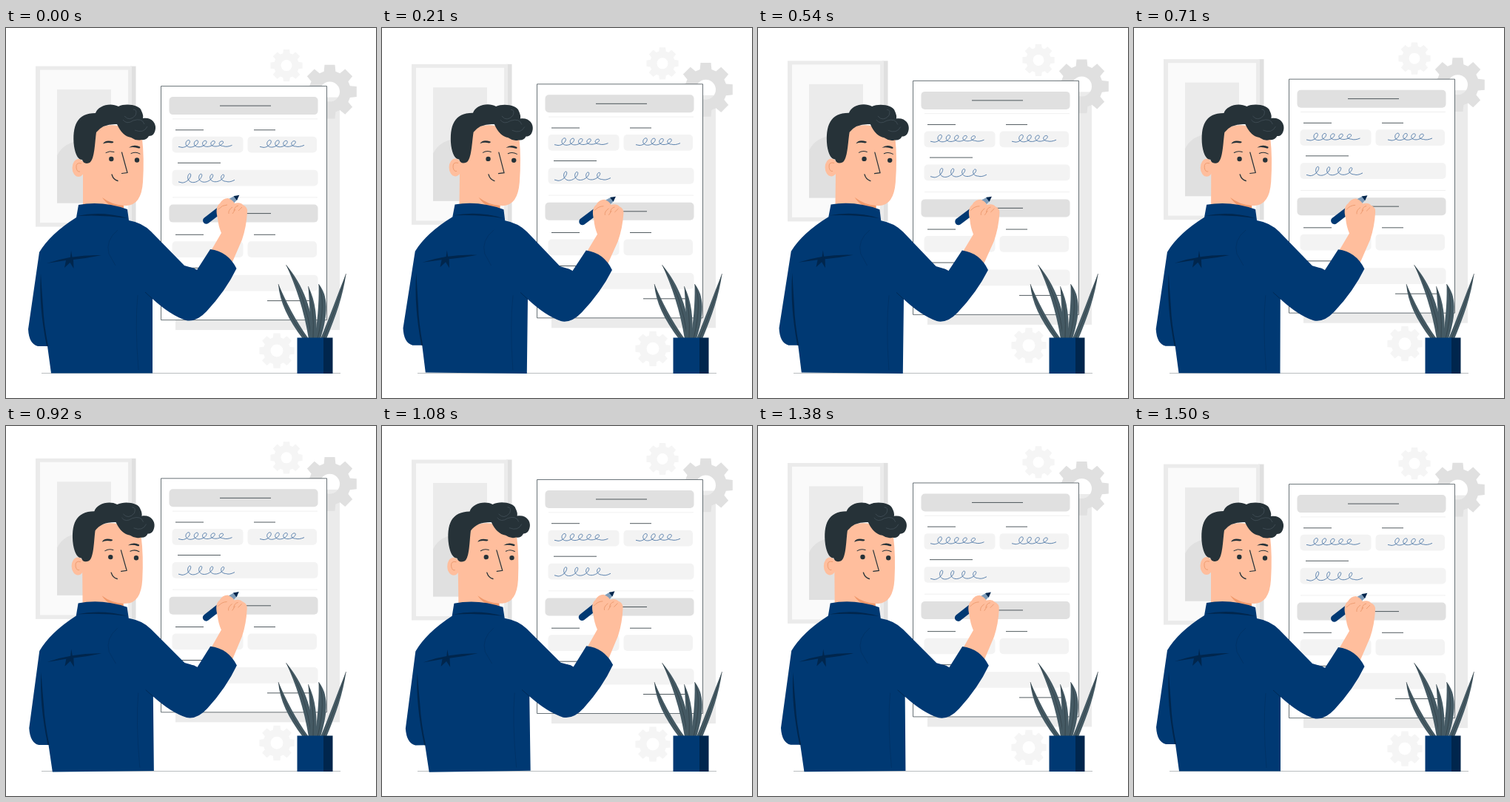
These frames come from a looping animation (500 px wide and 500 px high, 1.54 s). An HTML page with a canvas:

```html
<!DOCTYPE html>
<html lang="en">
<head>
<meta charset="utf-8">
<title>Filling in a form</title>
<style>
html, body { margin: 0; width: 100%; height: 100%; overflow: hidden; background: #fff; }
canvas { display: block; width: 100vmin; height: 100vmin; }
</style>
</head>
<body>
<canvas id="stage" width="500" height="500"></canvas>
<script>
const ctx = document.getElementById('stage').getContext('2d');
const LOOP = 1540, STEPS = 37;
const NAVY = '#003973', DEEP = '#00264d', SKIN = '#ffbe9d', HAIR = '#263238', LEAF = '#455a64';

function fill(path, color) {
  ctx.fillStyle = color;
  ctx.fill(new Path2D(path));
}

function stroke(path, color, width = 1) {
  ctx.strokeStyle = color;
  ctx.lineWidth = width;
  ctx.stroke(new Path2D(path));
}

function rect(x1, y1, x2, y2, color) {
  ctx.fillStyle = color;
  ctx.fillRect(x1, y1, x2 - x1, y2 - y1);
}

function pill(x1, y1, x2, y2, color) {
  ctx.fillStyle = color;
  ctx.beginPath();
  ctx.roundRect(x1, y1, x2 - x1, y2 - y1, 5);
  ctx.fill();
}

function rule(x1, x2, y, color = HAIR, width = 0.8) {
  stroke(`M${x1} ${y}H${x2}`, color, width);
}

function dot(x, y, rx, ry, color) {
  ctx.fillStyle = color;
  ctx.beginPath();
  ctx.ellipse(x, y, rx, ry, 0, 0, Math.PI * 2);
  ctx.fill();
}

function gear(x, y, outer, inner, hole, color) {
  ctx.fillStyle = color;
  ctx.beginPath();
  for (let i = 0; i < 8; i++) {
    const a = i * Math.PI / 4;
    for (const [r, d] of [[inner, -0.28], [outer, -0.19], [outer, 0.19], [inner, 0.28]]) {
      ctx.lineTo(x + r * Math.cos(a + d), y + r * Math.sin(a + d));
    }
  }
  ctx.closePath();
  ctx.moveTo(x + hole, y);
  ctx.arc(x, y, hole, 0, Math.PI * 2, true);
  ctx.fill('evenodd');
}

// A row of handwritten loops with a short tail.
function scribble(x, y, pitch, loops, height) {
  ctx.beginPath();
  ctx.moveTo(x - 5, y + height * 0.9);
  for (let u = 0; u <= loops; u += 0.03) {
    const a = u * Math.PI * 2, r = height / 2 * (1 - 0.07 * u);
    ctx.lineTo(x + pitch * u + 5 * Math.sin(a) - 1.5 * Math.cos(a) + 1.5, y + height / 2 + r * Math.cos(a));
  }
  const end = x + pitch * loops;
  ctx.quadraticCurveTo(end + 4, y + height, end + 11, y + height * 0.7);
  ctx.strokeStyle = '#2a5c96';
  ctx.lineWidth = 0.75;
  ctx.stroke();
}

function drawPicture() {
  rect(168, 51, 175.5, 268, '#e0e0e0');
  rect(40, 51, 170, 268, '#ebebeb');
  rect(46, 56, 165, 262.5, '#fafafa');
  rect(69, 82.5, 142, 236, '#ebebeb');
  fill('M69 236V172Q78 153 105 151Q142 155 142 190V236Z', '#e0e0e0');
}

function drawForm() {
  rect(229, 93, 451, 407.5, '#ebebeb');
  gear(437.5, 85.5, 37, 28.5, 13.5, '#e0e0e0');
  rect(209.5, 78, 433.5, 394, '#fff');
  stroke('M209.5 78H433.5V394H209.5Z', '#455056', 0.8);

  for (const y of [92.5, 238]) {
    pill(220.5, y, 421.5, y + 24, '#e0e0e0');
    rule(289, 358, y + 12);
  }
  for (const y of [122.3, 228.3]) rule(225, 421, y, '#ececec');
  for (const y of [137.2, 278.7]) {
    rule(229, 267, y);
    rule(335, 364, y);
    pill(224.5, y + 9, 320.5, y + 30.7, '#f3f3f3');
    pill(326.5, y + 9, 420, y + 30.7, '#f3f3f3');
  }
  for (const y of [181.7, 323.7]) {
    rule(232, 290, y);
    pill(224.5, y + 9.5, 421.5, y + 31.2, '#f3f3f3');
  }
  rule(353, 411, 368);

  scribble(238, 150.8, 11.3, 5, 10);
  scribble(348, 150.8, 11, 4, 10);
  scribble(238, 196, 15, 4, 12.5);
}

function drawPen() {
  ctx.save();
  ctx.translate(267, 263);
  ctx.rotate(Math.atan2(-37, 48));
  pill(0, -4.7, 49, 4.7, NAVY);
  fill('M45 -4.7L56 -3V3L45 4.7Z', '#7e9cb9');
  fill('M54 -3.6L61 0L54 3.6Z', DEEP);
  ctx.restore();
}

function drawHead() {
  dot(98, 189, 8.5, 12, SKIN);
  fill('M120 138Q150 120 184 150Q187 175 185 208Q183 239 163 240L159 240V250L104 248V170Z', SKIN);
  fill('M130 229Q143 239 159 240V246Q139 243 130 229Z', '#f0996c');
  stroke('M102 183Q94 181 95 189Q96 195 100 194', '#eb996e', 0.9);

  fill('M92 160C89 132 96 115 121 115C124 105 141 100 152 106C162 101 181 104 183 112' +
    'Q186 118 185 122C197 120 203 129 202 136C201 143 198 146 193 146' +
    'Q190 152 183 151Q176 153 169 148Q157 146 150 130Q131 129 122 141' +
    'C120 154 120 178 113 182Q105 185 103 178Q95 178 92 160Z', HAIR);
  stroke('M160 119Q167 127 175 118Q178 110 172 110M158 124Q163 131 172 125' +
    'Q184 121 187 130M174 138Q186 143 191 133', '#52606a', 0.5);

  fill('M131 156.5Q134 150.5 145 153.5Q146 155 143 155.5Q136 154 131 156.5Z', HAIR);
  fill('M166 161.5Q173 156.5 181 160.5Q182 163 179 162.5Q173 160 166 161.5Z', HAIR);
  ctx.lineCap = 'round';
  stroke('M135 168.5Q140 165.5 146 167.5M169 169.5Q175 166.5 181 170', HAIR, 1);
  dot(142.3, 177, 3.2, 3.2, HAIR);
  dot(177, 178.5, 3.2, 3.2, HAIR);
  stroke('M156.5 168L164 195.5L156.5 196.5', HAIR, 1.2);
  stroke('M143 198Q145 205 151 206.5', HAIR, 1.3);
  ctx.lineCap = 'butt';
}

function drawHand() {
  fill('M277 301L291 277Q287 268 286 257C283 246 285 240 289 237Q293 230 300 230' +
    'Q306 232 309 237Q317 235 320 239Q327 242 326 249Q325 268 319 286L306 316Z', SKIN);
  stroke('M287 245Q292 239 299 239M301 251Q300 246 306 242M308 247Q309 241 314 240' +
    'M314 247L319 242M306 251L310 245', '#eb996e', 0.9);
}

function drawBody() {
  fill('M98 239Q130 233 164 245L166 260Q184 263 196 275L241 321Q250 323 258 327' +
    'L276 299Q300 302 311.5 325Q297 355 271 383Q257 398 243 395Q222 388 198 366' +
    'V466.5H61L56 430H43Q31 427 30 407L45 303Q60 278 95 256Z', NAVY);
  fill('M96 254Q129 247 164 257Q130 252 96 254Z', DEEP);
  fill('M47 332Q44 375 55 430H57Q51 400 50 375Q48 350 47 332Z', DEEP);
  fill('M55 318Q90 306 129 307Q110 311 91 313L91.5 325L86.5 317L79 324L81 314Z', DEEP);
  fill('M88 301L86.5 314L90 313Z', DEEP);
  fill('M243 326Q250 321 258 327Q252 331 243 326Z', NAVY);
  stroke('M151 273Q134 287 139 305L148 321M178 361Q174 400 179 462', '#02305f', 0.6);
  stroke('M198 366L188 357', DEEP, 0.8);
}

function drawPerson() {
  drawHead();
  drawPen();
  drawHand();
  drawBody();
}

// A blade from its tip to the pot, bending towards one control point.
function leaf(tipX, tipY, bendX, bendY, baseX, width) {
  const x1 = (tipX + 2 * bendX) / 3, y1 = (tipY + 2 * bendY) / 3;
  const x2 = (baseX + 2 * bendX) / 3, y2 = (420 + 2 * bendY) / 3;
  fill(`M${tipX} ${tipY}C${x1 - width} ${y1} ${x2 - width} ${y2} ${baseX - 4} 420H${baseX + 4}` +
    `C${x2 + width} ${y2} ${x1 + width} ${y1} ${tipX} ${tipY}Z`, LEAF);
  stroke(`M${tipX} ${tipY}Q${bendX} ${bendY} ${baseX} 420`, HAIR, 0.5);
}

function drawPlant() {
  leaf(459.5, 332, 448, 375, 429, 4);
  leaf(368, 346, 377, 382, 405, 4.5);
  leaf(378.5, 320, 406, 362, 413, 5.5);
  leaf(422.5, 346, 433, 370, 421, 6.5);
  leaf(408.5, 349, 417, 380, 415, 4.5);
  rect(393.5, 418.5, 430, 467, NAVY);
  rect(429, 418.5, 441.5, 467, DEEP);
}

function draw(time) {
  const step = Math.floor((time % LOOP) / LOOP * STEPS + 0.01);
  const phase = step / (STEPS - 1);
  const lift = 10 * (1 - Math.abs(2 * phase - 1));
  const sway = 0.0155 * Math.sin(phase * Math.PI * 2);

  ctx.setTransform(1, 0, 0, 1, 0, 0);
  rect(0, 0, 500, 500, '#fff');

  ctx.save();
  ctx.translate(0, 0.6 - lift);
  drawPicture();
  gear(379, 50, 22, 17, 7.5, '#f5f5f5');
  gear(366, 435.5, 24, 18.5, 8.5, '#f5f5f5');
  drawForm();
  ctx.restore();

  rule(48, 452, 466.5, '#a9aeb0', 0.8);
  drawPlant();

  ctx.save();
  ctx.translate(150, 281);
  ctx.rotate(sway);
  ctx.translate(-150, -281);
  drawPerson();
  ctx.restore();
}

const start = performance.now();
function tick() {
  draw(performance.now() - start);
  requestAnimationFrame(tick);
}
tick();
</script>
</body>
</html>
```
